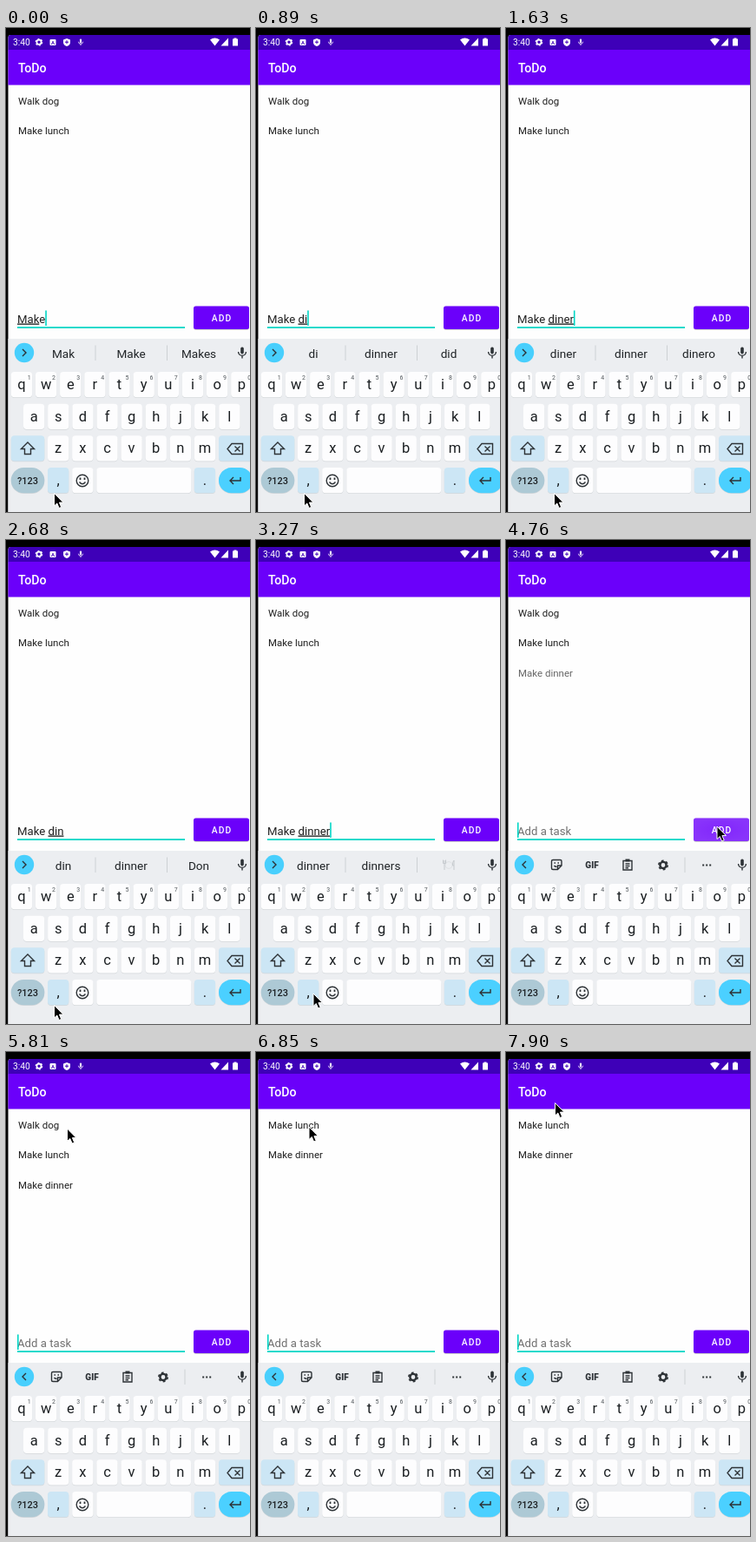
These frames come from a looping animation (281 px wide and 556 px high, 8 s). An HTML page:

```html
<!DOCTYPE html>
<html lang="en">
<head>
<meta charset="utf-8">
<style>
  html, body { margin: 0; width: 100%; height: 100%; overflow: hidden; background: #000; }
  svg { display: block; width: 281px; height: 556px; font-family: Roboto, sans-serif; }
  text { white-space: pre; }
  .mid { text-anchor: middle; }
  .row { font-size: 11.5px; fill: #202020; }
  .field { font-size: 13.2px; fill: #202020; }
  .chip { font-size: 13.6px; fill: #1f2326; }
  .key { font-size: 16.5px; fill: #1b1f22; }
  .hint { font-size: 7px; fill: #50565a; }
  .line { fill: none; stroke: #2d3236; stroke-width: 1.4; }
  .typed { text-decoration: underline; text-decoration-thickness: 1px; text-underline-offset: 1px; }
</style>
</head>
<body>
<svg viewBox="0 0 281 556">
  <defs>
    <radialGradient id="ripple">
      <stop offset="0" stop-color="#fff" stop-opacity=".75"/>
      <stop offset="1" stop-color="#fff"/>
    </radialGradient>
    <g id="gear">
      <circle r="3.6" fill="none" stroke-width="2.4" stroke="currentColor"/>
      <circle r="5.2" fill="none" stroke-width="1.6" stroke="currentColor" stroke-dasharray="2.7 2.745"/>
    </g>
    <g id="mic" fill="none" stroke="currentColor">
      <rect x="-1.8" y="-6.5" width="3.6" height="8" rx="1.8" fill="currentColor" stroke="none"/>
      <path d="M-4.4-1a4.4 4.4 0 0 0 8.8 0M0 3.5V6.5" stroke-width="1.4"/>
    </g>
  </defs>

  <!-- App -->
  <path d="M2.5 556V11q0-3 3-3H281V556z" fill="#fefefe"/>
  <path d="M2.5 25.5V11q0-3 3-3H281V25.5z" fill="#3e00b8"/>
  <rect x="2.5" y="25" width="279" height="40.5" fill="#6b00fa"/>
  <g fill="#fff" color="#fff">
    <text x="8" y="20" font-size="10.3">3:40</text>
    <use href="#gear" transform="translate(38 16.3) scale(.72)"/>
    <rect x="50.5" y="13" width="7" height="7" rx="1"/>
    <text class="mid" x="54" y="18.7" font-size="6" font-weight="700" style="fill:#3e00b8">A</text>
    <path d="M70 12l4 1.5v3q0 3-4 4.5q-4-1.500-4-4.500v-3z"/>
    <path d="M70 14.200v4M68 16.200h4" stroke="#3e00b8"/>
    <use href="#mic" transform="translate(86 16.300) scale(.58)"/>
    <path d="M235 13.500q5.500-4 11 0L240.500 20.500zM247.500 20.500h8.500v-9z"/>
    <path d="M261 12.500h1.500v-1h3v1h1.500v8h-6z"/>
    <text x="14" y="51" font-size="14.2" font-weight="500">ToDo</text>
  </g>
  <g id="rows"></g>

  <rect x="13" y="343.200" width="193" height="1.800" fill="#03d6c6"/>
  <text id="field" class="field" x="13" y="338.500"></text>
  <rect id="caret" y="324.500" width="1.600" height="17.500" fill="#03d6c6"/>
  <rect x="216" y="320.500" width="64" height="26.500" rx="3" fill="#000" opacity=".2"/>
  <rect x="216" y="319.500" width="64" height="26.500" rx="2.500" fill="#6b00fa"/>
  <rect id="press" x="216" y="319.500" width="64" height="26.500" rx="2.500" fill="url(#ripple)"/>
  <text class="mid" x="248.500" y="336.800" font-size="10.300" font-weight="500" letter-spacing="1" fill="#fff">ADD</text>

  <!-- Keyboard -->
  <rect x="2.500" y="357" width="279" height="199" fill="#eceef1"/>
  <circle cx="21" cy="373" r="11.200" fill="#48cffd"/>
  <path id="chevron" d="M-2-4L2 0L-2 4" class="line" stroke-width="1.600"/>
  <g id="chips">
    <path d="M103 364.500v17.500M185.500 364.500v17.500" stroke="#cdd1d4"/>
    <text class="chip mid" x="66" y="378.500"></text>
    <text class="chip mid" x="144" y="378.500"></text>
    <text class="chip mid" x="222" y="378.500"></text>
    <g id="meal" fill="none" stroke="#c6cace">
      <circle cx="222" cy="373.500" r="4" stroke="#dfe2e5"/>
      <path d="M215.500 367.500v4h3v-4M217 368v11M228 379v-11q-2 2-1.500 6h1.500"/>
    </g>
  </g>
  <g id="tools" class="line" color="#2d3236">
    <path d="M54 367.500h8.500q1.500 0 1.500 1.500v5l-4.500 4.500H54q-1.500 0-1.500-1.500v-8q0-1.500 1.500-1.500zM64 374h-4.500v4.500M55.500 374q1.500 2 3 1"/>
    <path d="M55.500 371h1.500M59.500 371h1.500" stroke-width="1.600"/>
    <text class="mid" x="99" y="377" font-size="10" font-weight="900" fill="#2d3236" stroke="none">GIF</text>
    <path d="M135 368.500h10v10.500h-10zM137.500 372h5M137.500 374.500h5M137.500 376.800h3.500"/>
    <path d="M137.500 368h5" stroke-width="3"/>
    <use href="#gear" transform="translate(181 373.500)"/>
    <path d="M206 364.500v17.500" stroke="#cdd1d4" stroke-width="1"/>
    <path d="M226.200 373.500h2M230.200 373.500h2M234.200 373.500h2" stroke-width="2"/>
  </g>
  <use href="#mic" x="272" y="373" color="#2d3236"/>
  <g id="keys"></g>
  <g class="line">
    <path d="M25 476l7.500 7.500h-4v6h-7v-6h-4z"/>
    <path d="M260 477.500h12.500v12H260l-5-6zM263.500 480.500l6 6M269.500 480.500l-6 6"/>
    <circle cx="88" cy="520" r="6.800"/>
    <path d="M84.500 521.500q3.500 4.500 7 0"/>
    <path d="M85.500 516.500v2.500M90.500 516.500v2.500" stroke-width="1.800"/>
    <path d="M270 516v4h-12M262 516l-4 4l4 4"/>
  </g>
  <path id="mouse" d="M0 0V14.500L3.300 11.500L5.600 17L8.200 15.900L5.900 10.600H10.400z" fill="#000" stroke="#fff"/>
</svg>

<script>
const LOOP = 8000;
const $ = id => document.getElementById(id);

// [time, text, underlined letters of the last word, suggestions]
const typing = [
  [0, 'Make', 3, 'Mak Make Makes'],
  [150, 'Make', 4, 'Make Makes Maker'],
  [450, 'Make ', 0, 'sure a it'],
  [600, 'Make d', 1, 'd dinner do'],
  [890, 'Make di', 2, 'di dinner did'],
  [1190, 'Make dine', 4, 'dine dinner diner'],
  [1330, 'Make diner', 4, 'dine dinner diner'],
  [1630, 'Make diner', 5, 'diner dinner dinero'],
  [2080, 'Make dine', 4, 'dine dinner diner'],
  [2230, 'Make din', 3, 'din dinner Don'],
  [2830, 'Make dinn', 4, 'dinn dinner dinners'],
  [2980, 'Make dinne', 5, 'dinne dinner dinners'],
  [3130, 'Make dinner', 6, 'dinner dinners'],
  [4760, '', 0, '']
];
const mouseMoves = [
  [0, 55.5, 534.5], [3270, 66, 521], [3420, 98, 482], [3570, 150, 418], [3720, 203, 355],
  [3870, 243, 329], [5210, 233, 308], [5360, 202, 250], [5510, 154, 182], [5660, 110, 129],
  [5810, 70.5, 88], [5960, 64, 86], [6110, 61, 86], [7750, 59, 74], [7900, 56.5, 58.5]
];
const caretToggles = [150, 450, 2680, 2830, 3720, 4320, 5210, 5660, 6110, 6710, 7150, 7750];
const pressLevels = [[0, 0], [4620, .12], [4760, .2], [4910, .17], [5060, .1], [5210, .04], [5360, 0]];
// [time, text, y, opacity] for each list row
const rows = [
  ['Walk dog', [0, 87.5, 1], [6710, 87.5, 0]],
  ['Make lunch', [0, 122.3, 1], [6710, 105, 1], [6850, 87.5, 1]],
  ['Make dinner', [0, 157.1, 0], [4760, 157.1, .68], [4910, 157.1, 1], [6710, 140, 1], [6850, 122.3, 1]]
];

const at = (track, t) => track.findLast(step => step[0] <= t);

function key(x, y, w, label = '', fill = '#fdfdfe', rx = 4) {
  return `<rect x="${x}" y="${y + 1}" width="${w}" height="29" rx="${rx}" fill="#d3d7da"/>
    <rect x="${x}" y="${y}" width="${w}" height="29.3" rx="${rx}" fill="${fill}"/>
    <text class="key mid" x="${x + w / 2}" y="${y + 20}">${label}</text>`;
}

function buildKeys() {
  const pitch = 28.15, blue = '#cce6f5';
  const letters = (word, x, y) => [...word].map((c, i) => key(x + i * pitch, y, 24.3, c)).join('');
  const digits = [...'1234567890'].map((d, i) =>
    `<text class="hint mid" x="${26.8 + i * pitch}" y="403.5">${d}</text>`).join('');
  $('keys').innerHTML =
    letters('qwertyuiop', 5.8, 395) + digits +
    letters('asdfghjkl', 20, 431.7) +
    key(5.8, 468.3, 38.5, '', blue) + letters('zxcvbnm', 48, 468.3) + key(245, 468.3, 42, '', blue) +
    key(5.8, 505, 38.5, '', '#adc9d5', 14.6) +
    '<text class="mid" x="25" y="524" font-size="11" font-weight="500" fill="#1b1f22">?123</text>' +
    key(48, 505, 24.3, ',', blue) + key(76.2, 505, 24.3) + key(104.3, 505, 109) +
    key(216.8, 505, 24.3, '.', blue) + key(245, 505, 39, '', '#4bd0ff', 14.6);
}

function drawField(text, underlined) {
  const start = text.lastIndexOf(' ') + 1, end = start + underlined;
  const field = $('field');
  field.innerHTML = text
    ? `${text.slice(0, start)}<tspan class="typed">${text.slice(start, end)}</tspan>${text.slice(end)}`
    : 'Add a task';
  field.style.fill = text ? '' : '#707070';
  $('caret').setAttribute('x', 13 + (text ? field.getComputedTextLength() : 0));
}

function drawSuggestions(words) {
  const open = words !== '';
  const list = words.split(' ');
  document.querySelectorAll('.chip').forEach((chip, i) => chip.textContent = list[i] || '');
  $('chips').style.display = open ? '' : 'none';
  $('tools').style.display = open ? 'none' : '';
  $('meal').style.display = list.length === 2 ? '' : 'none';
  $('chevron').setAttribute('transform', `translate(21 373) scale(${open ? 1 : -1} 1)`);
}

let shown;
function render() {
  const t = performance.now() % LOOP;
  const state = at(typing, t);
  if (state !== shown) {
    shown = state;
    drawField(state[1], state[2]);
    drawSuggestions(state[3]);
  }
  $('caret').style.opacity = 1 - caretToggles.filter(time => time <= t).length % 2;
  $('press').style.opacity = at(pressLevels, t)[1];
  const [, x, y] = at(mouseMoves, t);
  $('mouse').setAttribute('transform', `translate(${x} ${y})`);
  rows.forEach(([, ...track], i) => {
    const [, rowY, opacity] = at(track, t);
    const row = $('rows').children[i];
    row.setAttribute('y', rowY);
    row.style.opacity = opacity;
  });
  requestAnimationFrame(render);
}

buildKeys();
$('rows').innerHTML = rows.map(([label]) => `<text class="row" x="14">${label}</text>`).join('');
render();
</script>
</body>
</html>
```
